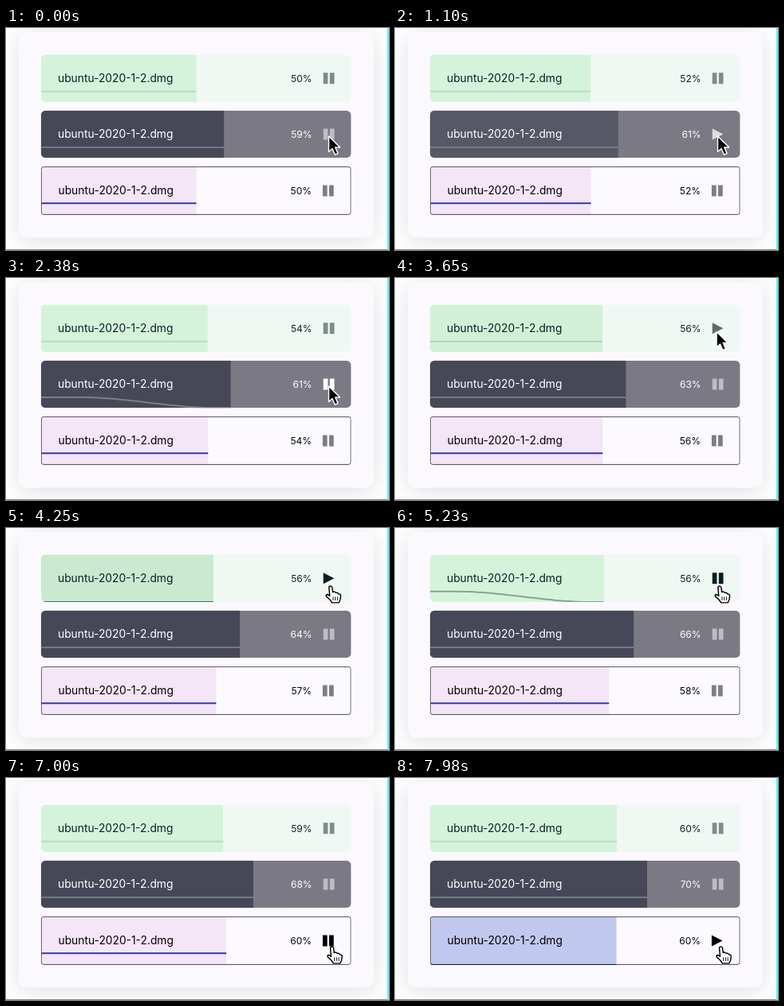
Recreate the animation shown at these times as an HTML page. Size 480x279 px, loop 8 s.

```html
<!DOCTYPE html>
<html lang="en">
<head>
<meta charset="utf-8">
<title>Download progress</title>
<style>
  html, body { margin: 0; width: 100%; height: 100%; overflow: hidden; background: #fff; }
  svg { display: block; width: 480px; height: 279px; }
  text { font-family: Inter, "Open Sans", sans-serif; }
  .name { font-size: 13.8px; }
  .percent { font-size: 12px; text-anchor: end; }
  .line { fill: none; stroke-width: 2; }
  .card { fill: #fbf9fd; filter: drop-shadow(0 4px 14px rgba(30, 25, 55, .14)); }
</style>
</head>
<body>
<svg viewBox="0 0 480 279">
  <rect class="card" x="16" y="5" width="445" height="258.5" rx="10"/>
  <rect x="477.7" width="2.3" height="279" fill="#62f0fb"/>
  <rect y="278" width="478" height="1" fill="#8b8b8e"/>
  <g id="bars"></g>
  <g id="cursor" stroke-linejoin="round">
    <path id="arrow" d="M0 0V19.5L4.5 15.4L7.8 23.2L11.5 21.6L8.2 14H14.2Z"
      fill="#000" stroke="#fff" stroke-width="1.4"/>
    <g id="hand" transform="scale(.95)" fill="#fff" stroke="#000" stroke-width="1.5" stroke-linecap="round">
      <path d="M-2 2Q-2 0 0 0Q2 0 2.2 2L3 8Q6 6.5 7 9Q9.5 8 10.5 10.5Q13.5 10 13.5 13Q13.5 18 11 22H2Q0 18 -5.5 13.5Q-6.5 11 -4 11L-1 13Z"/>
      <path d="M3.4 14.5v4m2.9-4v4m2.9-4v4" fill="none" stroke-width="1"/>
    </g>
  </g>
</svg>
<script>
const LOOP = 8000, LEFT = 43.8, WIDTH = 388.8, TOP = 33.5, PITCH = 70.2, LINE_Y = 46.3;
const FADE_MS = 150, LINE_FADE_MS = 600, HOVER_MS = 300;
const WAVE_LENGTH = 170, WAVE_START = -220, WAVE_SPEED = 0.8;
const $ = id => document.getElementById(id);
const clamp = v => Math.min(1, Math.max(0, v));
const mix = (a, b, k) => a + (b - a) * k;
const smooth = v => { v = clamp(v); return v * v * (3 - 2 * v); };

// rate and drag: percent gained per running second, and how it slows;
// pause, resume and hover are times in ms
const bars = [
  {
    back: '#f0f8f3', fill: '#d5f3da', paused: '#c9e9d0', ink: '#0a1f24',
    line: '#b8dcc0', pausedLine: '#4a6a5a',
    start: 50.1, rate: 1.52, drag: 0, pause: 3600, resume: 4915, hover: [3560, 5400]
  },
  {
    back: '#7b7a84', fill: '#474857', paused: '#686976', ink: '#ffffff',
    line: '#757683', pausedLine: '#858692',
    start: 59, rate: 1.58, drag: 0, pause: 1030, resume: 2043, hover: [950, 2850]
  },
  {
    back: '#fcfafe', fill: '#f4e5f7', paused: '#c0c8ee', ink: '#000000',
    line: '#3239a2', pausedLine: '#14164a', border: '#4b4953',
    start: 50.1, rate: 1.7, drag: 0.045, pause: 7340, resume: Infinity, hover: [5950, LOOP]
  }
];

function barMarkup(bar, i) {
  const { y, height, inset, ink } = bar;
  const shape = `x="${LEFT}" y="${y}" width="${WIDTH}" height="${height}" rx="${inset ? 3 : 6}"`;
  const progress = `x="${LEFT + inset}" y="${y}" height="${height}"`;
  const middle = y + height / 2;
  const border = inset && `<rect x="${LEFT + .5}" y="${y + .5}" width="${WIDTH - 1}"
    height="${height - 1}" rx="3" fill="none" stroke="${bar.border}"/>`;
  return `<clipPath id="clip${i}"><rect ${shape}/></clipPath>
    <g clip-path="url(#clip${i})">
      <rect ${shape} fill="${bar.back}"/>
      <rect class="fill" ${progress} fill="${bar.fill}"/>
      <rect class="tint" ${progress} fill="${bar.paused}"/>
      ${border || ''}
      <path class="line"/>
    </g>
    <text class="name" x="${65 + inset * .5}" y="${middle + 4.9}" fill="${ink}">ubuntu-2020-1-2.dmg</text>
    <text class="percent" x="${383.6 - inset * .5}" y="${middle + 4.4}" fill="${ink}"></text>
    <path class="icon" transform="translate(${397.7 - inset * .8} ${middle - 7})" fill="${ink}"/>`;
}

bars.forEach((bar, i) => {
  bar.inset = bar.border ? 1 : 0;
  bar.y = TOP + PITCH * i;
  bar.height = 59.6 + 1.4 * bar.inset;
  const group = document.createElementNS('http://www.w3.org/2000/svg', 'g');
  group.innerHTML = barMarkup(bar, i);
  $('bars').append(group);
  for (const part of ['fill', 'tint', 'line', 'percent', 'icon'])
    bar[part + 'El'] = group.querySelector('.' + part);
});

function progressAt({ start, rate, drag, pause, resume }, t) {
  const seconds = (Math.min(t, pause) + Math.max(0, t - resume)) / 1000;
  return start + rate * seconds - drag * seconds ** 2;
}

function wavePath(bar, width, isPaused, elapsed) {
  const front = WAVE_START + elapsed * WAVE_SPEED;
  const from = isPaused ? bar.height : LINE_Y;
  const to = isPaused ? LINE_Y : bar.height;
  const points = [];
  for (let x = 0; x < width + 6; x += 6) {
    const px = Math.min(x, width);
    const py = mix(from, to, smooth((px - front) / WAVE_LENGTH));
    points.push(`${LEFT + bar.inset + px} ${(bar.y + py).toFixed(2)}`);
  }
  return 'M' + points.join('L');
}

function drawBar(bar, t) {
  const isPaused = t >= bar.pause && t < bar.resume;
  const elapsed = t < bar.pause ? LOOP : t - (isPaused ? bar.pause : bar.resume);
  const pausedAmount = duration => {
    const k = clamp(elapsed / duration);
    return isPaused ? k : 1 - k;
  };
  const percent = progressAt(bar, t);
  const width = (WIDTH - 2 * bar.inset) * percent / 100;
  const [enter, leave] = bar.hover;
  const hover = clamp((t - enter) / HOVER_MS) - clamp((t - leave) / HOVER_MS);
  const lineMix = 100 * pausedAmount(LINE_FADE_MS);

  bar.fillEl.setAttribute('width', width);
  bar.tintEl.setAttribute('width', width);
  bar.tintEl.setAttribute('opacity', pausedAmount(FADE_MS));
  bar.lineEl.setAttribute('d', wavePath(bar, width, isPaused, elapsed));
  bar.lineEl.style.stroke = `color-mix(in srgb, ${bar.pausedLine} ${lineMix}%, ${bar.line})`;
  bar.percentEl.textContent = Math.round(percent) + '%';
  bar.iconEl.setAttribute('d', isPaused ? 'M0 0L13.6 7L0 14Z' : 'M0 0h5.7v14h-5.7zM8.1 0h5.7v14h-5.7z');
  bar.iconEl.setAttribute('opacity', 0.5 + 0.5 * hover);
}

// The pointer rests at a place, then glides to the next one.
const home = { x: 404.5, y: 136 };
const glides = [
  { at: 2600, ms: 650, x: 403, y: 67.5 },
  { at: 3900, ms: 300, x: 406.7, y: 73 },
  { at: 5250, ms: 750, x: 438, y: 226 },
  { at: 6000, ms: 260, x: 408.4, y: 212 }
];
const HAND_FROM = 3950;

function drawCursor(t) {
  let { x, y } = home;
  for (const glide of glides) {
    const k = smooth((t - glide.at) / glide.ms);
    x = mix(x, glide.x, k);
    y = mix(y, glide.y, k);
  }
  $('cursor').setAttribute('transform', `translate(${x} ${y})`);
  const isHand = t >= HAND_FROM;
  $('arrow').style.display = isHand ? 'none' : '';
  $('hand').style.display = isHand ? '' : 'none';
}

const begin = performance.now();
function render() {
  const t = (performance.now() - begin) % LOOP;
  bars.forEach(bar => drawBar(bar, t));
  drawCursor(t);
  requestAnimationFrame(render);
}
render();
</script>
</body>
</html>
```
